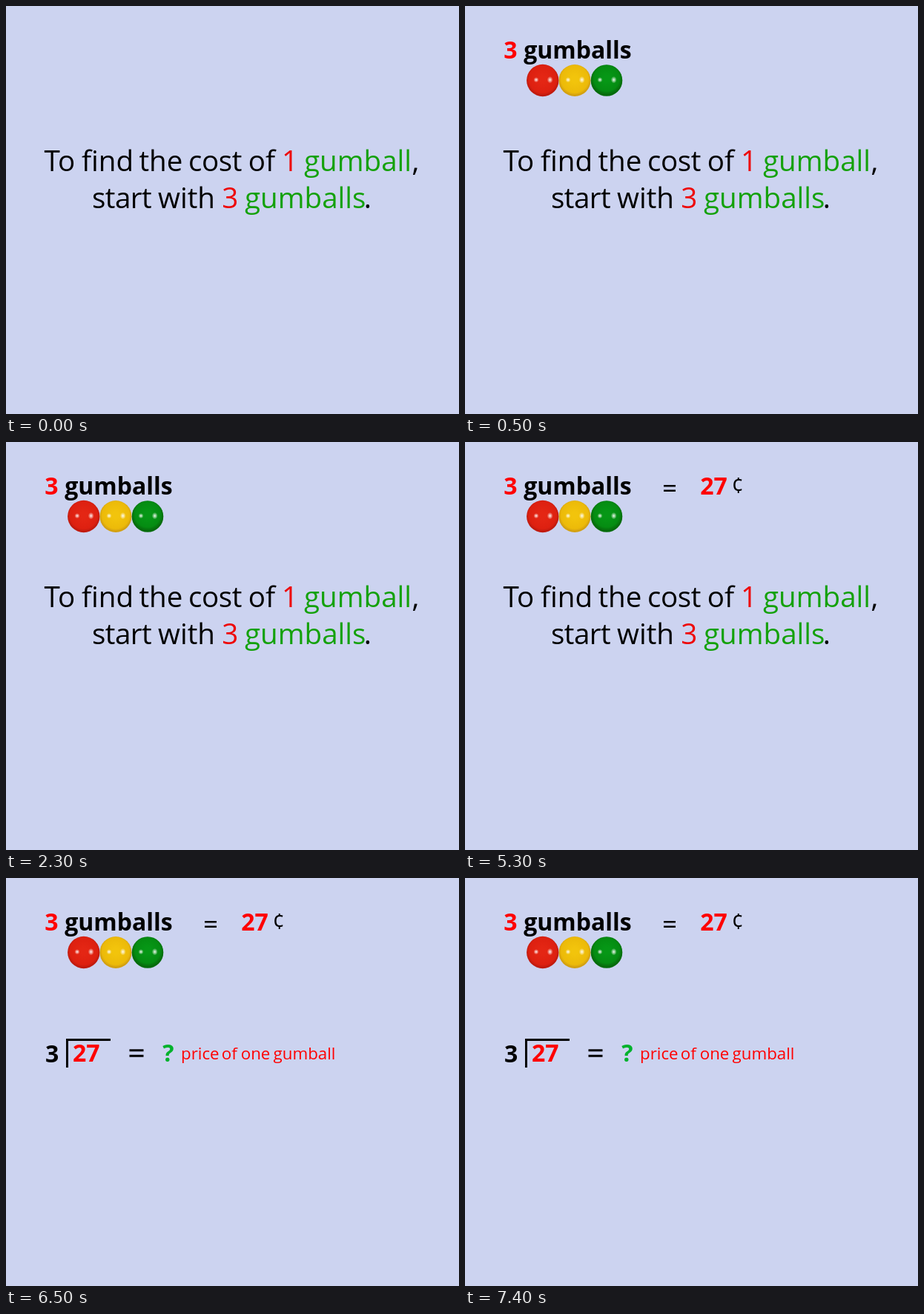
Write an HTML page that moves like this. It is 611x551 px and loops after 8000 ms.

```html
<!DOCTYPE html>
<html lang="en">
<head>
<meta charset="utf-8">
<title>Cost of one gumball</title>
<style>
  html, body { margin: 0; width: 100%; height: 100%; overflow: hidden; background: #ccd3f0; }
  svg { display: block; width: 611px; height: 551px; font-family: "Open Sans", "Noto Sans", sans-serif; }
  .intro { font-size: 38.5px; font-weight: 430; }
  .bold { font-size: 32px; font-weight: 700; }
  .note { font-size: 22.3px; font-weight: 430; fill: #f00; }
  .red { fill: #f00; }
  .num { fill: #ee0505; }
  .green { fill: #14a10a; }

  .intro, .balls, .price, .division { animation: 8s step-end infinite; }
  .intro { animation-name: intro; }
  .balls { animation-name: balls; }
  .price { animation-name: price; }
  .division { animation-name: division; }
  @keyframes intro { 0% { visibility: visible } 81.25%, 100% { visibility: hidden } }
  @keyframes balls { 0% { visibility: hidden } 6.25%, 100% { visibility: visible } }
  @keyframes price { 0% { visibility: hidden } 43.75%, 100% { visibility: visible } }
  @keyframes division { 0% { visibility: hidden } 81.25%, 100% { visibility: visible } }
</style>
</head>
<body>
<svg viewBox="0 0 611 551">
  <defs>
    <radialGradient id="red" cy=".46">
      <stop offset=".2" stop-color="#e42614"/><stop offset=".85" stop-color="#dd2010"/><stop offset="1" stop-color="#c01a0e"/>
    </radialGradient>
    <radialGradient id="yellow" cy=".46">
      <stop offset=".2" stop-color="#f2c40c"/><stop offset=".85" stop-color="#ecba09"/><stop offset="1" stop-color="#d3a010"/>
    </radialGradient>
    <radialGradient id="green" cy=".44">
      <stop offset=".2" stop-color="#069716"/><stop offset=".8" stop-color="#058c12"/><stop offset="1" stop-color="#066c0c"/>
    </radialGradient>
    <radialGradient id="shine">
      <stop offset=".1" stop-color="#fff" stop-opacity=".85"/><stop offset="1" stop-color="#fff" stop-opacity="0"/>
    </radialGradient>
    <g id="glints" fill="url(#shine)">
      <ellipse cx="-9" cy="-.8" rx="3.6" ry="3.6"/>
      <ellipse cx="9.7" cy="-.8" rx="4" ry="4.8"/>
    </g>
  </defs>

  <g class="balls">
    <text class="bold" y="71"><tspan class="red" x="52.3">3</tspan><tspan x="79.2">gumballs</tspan></text>
    <circle cx="104.8" cy="100.5" r="21.7" fill="url(#red)"/>
    <circle cx="148" cy="100.5" r="21.5" fill="url(#yellow)"/>
    <circle cx="191" cy="100.5" r="21.3" fill="url(#green)"/>
    <use href="#glints" x="105" y="100.5"/>
    <use href="#glints" x="148" y="100.5"/>
    <use href="#glints" x="191" y="100.5"/>
  </g>

  <g class="price">
    <path d="M268 59.2h16M268 65.8h16" stroke="#000" stroke-width="2.6"/>
    <text class="bold red" x="317.3" y="71">27</text>
    <text x="359.4" y="69" font-size="29">¢</text>
  </g>

  <text class="intro" y="222.7">
    <tspan x="51.5">To</tspan><tspan x="102">find</tspan><tspan x="179.5">the</tspan><tspan x="246" letter-spacing="-.4">cost</tspan><tspan x="326.8">of</tspan><tspan class="num" x="372">1</tspan><tspan class="green" x="402">gumball</tspan><tspan x="547.7">,</tspan>
  </text>
  <text class="intro" y="272.7">
    <tspan x="116" letter-spacing="-.5">start</tspan><tspan x="205">with</tspan><tspan class="num" x="291.2">3</tspan><tspan class="green" x="322">gumballs</tspan><tspan x="482.7">.</tspan>
  </text>

  <g class="division">
    <text class="bold" y="248.5"><tspan x="53">3</tspan><tspan class="red" x="90" y="248">27</tspan><tspan x="211.3" y="247.5" fill="#00b22c">?</tspan></text>
    <path d="M82.5 256V218.5H141M166.5 232.8h19M166.5 240.3h19" fill="none" stroke="#000" stroke-width="3"/>
    <text class="note" y="245"><tspan x="236">price</tspan><tspan x="290.7">of</tspan><tspan x="316.7">one</tspan><tspan x="360.5">gumball</tspan></text>
  </g>
</svg>
</body>
</html>
```
